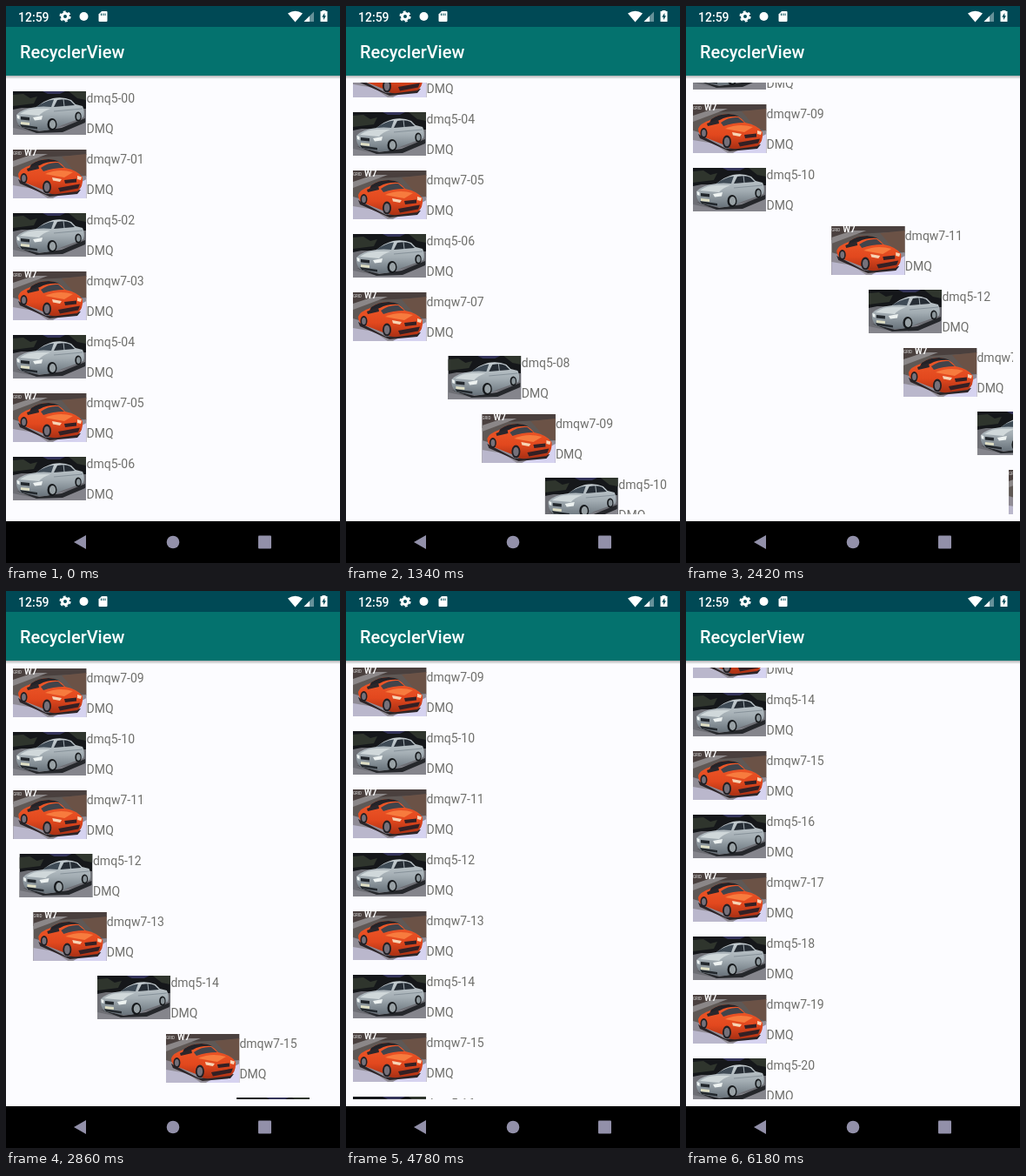
An HTML page for the animation above (8 s loop, 384x640 px).

```html
<!DOCTYPE html>
<html lang="en">
<head>
<meta charset="utf-8">
<title>RecyclerView</title>
<style>
  html, body { margin: 0; width: 100%; height: 100%; overflow: hidden; background: #fcfcff; }
  svg { display: block; width: 100%; height: 100%; }
  text { font-family: Roboto, sans-serif; }
  .row text { font-size: 14px; fill: #6f6f6c; }
  .bar text { fill: #fff; font-weight: 500; }
</style>
</head>
<body>
<svg viewBox="0 0 384 640">
  <defs>
    <clipPath id="list"><rect x="8" y="88" width="368" height="496"/></clipPath>
    <clipPath id="silverBox"><rect width="84" height="50"/></clipPath>
    <clipPath id="orangeBox"><rect width="84.5" height="56"/></clipPath>
    <linearGradient id="shade" x2="0" y2="1">
      <stop offset="0" stop-color="#000" stop-opacity=".3"/>
      <stop offset="1" stop-color="#000" stop-opacity="0"/>
    </linearGradient>
    <linearGradient id="steel" x2="0" y2="1">
      <stop offset="0" stop-color="#c6ced2"/>
      <stop offset=".5" stop-color="#a3adb3"/>
      <stop offset="1" stop-color="#69737b"/>
    </linearGradient>
    <linearGradient id="paint" x2="0" y2="1">
      <stop offset="0" stop-color="#ee5a2a"/>
      <stop offset=".6" stop-color="#e2481e"/>
      <stop offset="1" stop-color="#a93014"/>
    </linearGradient>

    <g id="silver" clip-path="url(#silverBox)">
      <rect width="84" height="50" fill="#15171a"/>
      <path d="M0 4L12 3 20 8 28 6 24 14 0 17ZM64 0H84V10L74 8Z" fill="#2f352d"/>
      <path d="M34 0H60L54 3H40Z" fill="#34345a"/>
      <path d="M0 21L10 19 84 20V50H0Z" fill="#6d6e74"/>
      <path d="M0 42L24 47 84 35V50H0Z" fill="#85858c"/>
      <path d="M4 39L30 46 56 42 83 31V36L57 47 27 48Z" fill="#25272b"/>
      <path d="M4 27Q10 20 27 18Q37 10 46 8Q58 6 67 10L72 15L80 17Q83 23 81 30L56 39Q47 45 30 45L9 41Q3 36 4 27Z" fill="url(#steel)"/>
      <path d="M27 18Q36 11 47 9.500L44 18Q35 17 27 18Z" fill="#3f4b56"/>
      <path d="M47 18L51 10Q61 8 66 11L71 16Z" fill="#252c34"/>
      <path d="M58 9L59 17" stroke="#a3adb3"/>
      <path d="M8 26Q16 20 27 20L43 20Q34 23 30 28Z" fill="#d0d8da"/>
      <path d="M47 23L80 20" stroke="#87929a"/>
      <path d="M9 29L19 30V33.500L9 32.500ZM8 38L28 41V43.500L10 41Z" fill="#23282d"/>
      <path d="M23 30L34 28 33 32.500 25 33.500ZM4.500 27L7.500 28V32L5 31Z" fill="#edf2f1"/>
      <path d="M9 35L19 36V39L9 38Z" fill="#dedec4"/>
      <ellipse cx="45" cy="38" rx="5.500" ry="7" fill="#16191c"/>
      <ellipse cx="45.500" cy="38" rx="3.600" ry="4.900" fill="#98a1a5"/>
      <ellipse cx="75" cy="29" rx="3.700" ry="5.500" fill="#16191c"/>
      <ellipse cx="75.300" cy="29" rx="2.300" ry="3.800" fill="#8b959a"/>
    </g>

    <g id="orange" clip-path="url(#orangeBox)">
      <rect width="84.5" height="56" fill="#5f5855"/>
      <path d="M0 0H84.500V6L28 9 0 16Z" fill="#4a403e"/>
      <path d="M0 13L24 5 40 5 0 20Z" fill="#8b8788"/>
      <path d="M56 8L84.500 5V31L70 24Z" fill="#6b5246"/>
      <path d="M0 30L20 36 84.500 30V56H0Z" fill="#8f8b95"/>
      <path d="M70 42L84.500 34V56H46Z" fill="#d6d3f0"/>
      <path d="M0 41L24 45 40 56H0Z" fill="#bab7cc"/>
      <path d="M6 34L38 51 78 46 74 51 42 54 8 39Z" fill="#2c2528"/>
      <path d="M6 28Q8 22 20 18Q28 11 41 11Q53 12 60 21Q75 24 80 32Q81 43 74 48L51 51Q42 52 37 47L14 38Q6 36 6 28Z" fill="url(#paint)"/>
      <path d="M21 17Q29 11 41 11Q49 11.500 53 14Q40 13 31 18L19 21Z" fill="#242328"/>
      <path d="M32 21Q41 14 52 15L59 21Q46 21 35 25Z" fill="#41444b"/>
      <path d="M16 22L29 17 30 22 17 25Z" fill="#2c272b"/>
      <path d="M37 28Q52 21 69 26L59 32Q47 30 37 28Z" fill="#f77b3e"/>
      <path d="M45 32L56 34 54 37 46 35.500ZM74 30L79 31.500 78 35 74 34Z" fill="#f7d4b5"/>
      <path d="M59 35L73 33.500V37.500L60 39ZM52 44L77 39.500 75 44.500 54 48.500Z" fill="#342024"/>
      <ellipse cx="12.500" cy="33" rx="4" ry="6" fill="#232024"/>
      <ellipse cx="12.500" cy="33" rx="2.400" ry="4" fill="#76717a"/>
      <ellipse cx="39" cy="43" rx="5" ry="7.500" fill="#232024"/>
      <ellipse cx="39" cy="43" rx="3.200" ry="5.300" fill="#76717a"/>
      <text x="0" y="6" style="font-size:4.500px;fill:#ddd">GRID</text>
      <text x="13" y="7" style="font-size:10px;font-weight:700;fill:#fff">W7</text>
    </g>
  </defs>

  <rect width="384" height="640" fill="#fcfcff"/>
  <g id="rows" clip-path="url(#list)"></g>

  <g class="bar">
    <rect y="80" width="384" height="4" fill="url(#shade)"/>
    <rect y="24" width="384" height="56" fill="#04726e"/>
    <rect width="384" height="24" fill="#004955"/>
    <text x="16" y="60" font-size="20">RecyclerView</text>
    <text x="14" y="17.500" font-size="14">12:59</text>
    <g fill="#fff">
      <circle cx="68" cy="12" r="3.500" fill="none" stroke="#fff" stroke-width="3"/>
      <circle cx="68" cy="12" r="5.600" fill="none" stroke="#fff" stroke-width="2" stroke-dasharray="2.930"/>
      <circle cx="89.500" cy="12" r="5"/>
      <path d="M110 6H115.500Q116.500 6 116.500 7V17Q116.500 18 115.500 18H107.500Q106.500 18 106.500 17V9.500Z"/>
      <path d="M109.500 8.500V11M111.800 8.500V11M114 8.500V11" stroke="#004955"/>
      <path d="M324 8.500Q332.500 3 341 8.500L332.500 18.500Z"/>
      <path d="M354 6.500V18H342.500Z" opacity=".4"/>
      <path d="M349 11.500V18H342.500Z"/>
      <path d="M363.500 6V5H367.500V6H369.500V18H361.500V6Z"/>
      <path d="M366.300 8L363.200 12.700H365V16L368 11.300H366.300Z" fill="#004955"/>
    </g>
  </g>

  <rect y="592" width="384" height="48" fill="#000"/>
  <g fill="#9290a9">
    <path d="M92 608V624L78 616Z"/>
    <circle cx="192" cy="616" r="7.300"/>
    <rect x="290" y="608.500" width="15" height="15" rx="1"/>
  </g>
</svg>

<script>
const LOOP = 8000, STEP = 40, SLIDE = 1000, WIDTH = 368, ROW = 70, COUNT = 21, FIRST = 8;

// Scroll path: [time, distance]
const path = [
  [480, 0], [700, 102], [778, 142], [904, 208], [1320, 256],
  [1820, 256], [1877, 280], [1951, 346], [2022, 418], [2203, 486], [2346, 558],
  [2420, 612], [2490, 627], [2780, 636],
  [4760, 636], [4959, 698], [5022, 768], [5060, 838], [5132, 908], [5300, 953], [5560, 961]
];
// When each row from FIRST on begins to slide in
const starts = [707, 778, 904, 1877, 1951, 2022, 2203, 2346, 2490, 4959, 5022, 5060, 5134];

const slope = i => (path[i + 1][1] - path[i][1]) / (path[i + 1][0] - path[i][0]);

// Monotone tangents: harmonic mean of the neighbouring slopes
const tangents = path.map((_, i) => {
  if (i === 0 || i === path.length - 1) return 0;
  const a = slope(i - 1), b = slope(i);
  return a * b > 0 ? 2 * a * b / (a + b) : 0;
});

function scrollAt(t) {
  if (t <= path[0][0]) return path[0][1];
  const i = path.findIndex(p => p[0] > t) - 1;
  if (i < 0) return path[path.length - 1][1];
  const [t0, y0] = path[i], [t1, y1] = path[i + 1];
  const h = t1 - t0, u = (t - t0) / h, v = 1 - u;
  return y0 * (1 + 2 * u) * v * v + y1 * u * u * (3 - 2 * u)
    + h * u * v * (tangents[i] * v - tangents[i + 1] * u);
}

function slideAt(i, t) {
  if (i < FIRST) return 0;
  const u = Math.min(1, Math.max(0, (t - starts[i - FIRST]) / SLIDE));
  return WIDTH * (1 + Math.cos(Math.PI * u)) / 2;
}

function make(parent, tag, attrs, label = '') {
  const el = document.createElementNS('http://www.w3.org/2000/svg', tag);
  for (const key in attrs) el.setAttribute(key, attrs[key]);
  el.textContent = label;
  return parent.appendChild(el);
}

const list = document.getElementById('rows');
const rows = Array.from({ length: COUNT }, (_, i) => {
  const odd = i % 2, row = make(list, 'g', { class: 'row' });
  make(row, 'use', { href: odd ? '#orange' : '#silver', y: odd ? 7 : 10 });
  make(row, 'text', { x: 84.5, y: 23 }, (odd ? 'dmqw7-' : 'dmq5-') + String(i).padStart(2, '0'));
  make(row, 'text', { x: 84.5, y: 58 }, 'DMQ');
  return row;
});

function draw(t) {
  const top = 88 - Math.round(scrollAt(t));
  rows.forEach((row, i) =>
    row.setAttribute('transform', `translate(${8 + slideAt(i, t)} ${top + ROW * i})`));
}

const begin = performance.now();
function tick() {
  const t = (performance.now() - begin) % LOOP;
  draw(Math.floor((t - 16) / STEP) * STEP + 20);
  requestAnimationFrame(tick);
}
tick();
</script>
</body>
</html>
```
